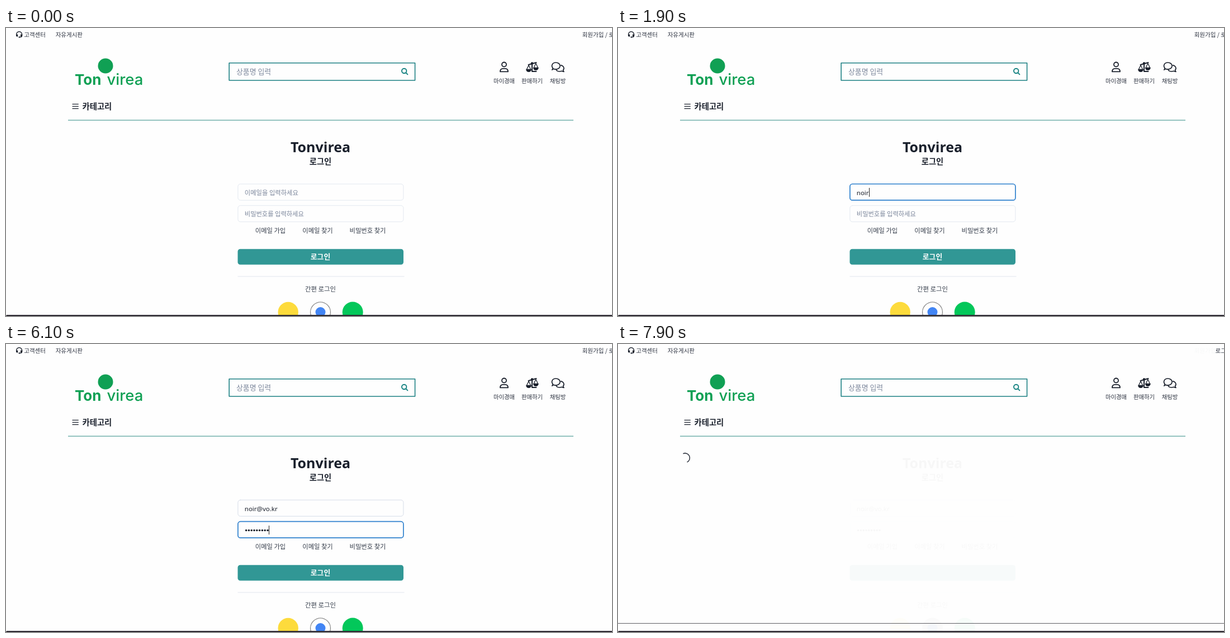
An HTML page with a canvas that plays this animation: 1084 px wide and 517 px high, repeating every 8 s.

```html
<!DOCTYPE html>
<html lang="ko">
<head>
<meta charset="utf-8">
<title>로그인</title>
<style>
html, body { margin: 0; width: 100%; height: 100%; overflow: hidden; background: #fefefe; }
canvas { display: block; width: 1084px; height: 517px; }
</style>
</head>
<body>
<canvas id="stage" width="1084" height="517"></canvas>
<script>
const ctx = document.getElementById('stage').getContext('2d');
const LOOP = 8000, STEP = 100;
const KO = '"Noto Sans CJK KR", "Noto Sans CJK JP", "Noto Sans CJK", sans-serif';
const LATIN = '"Noto Sans", "Open Sans", sans-serif';
const INK = '#1a202c', TEAL = '#319795', TEAL_DARK = '#2c7a7b', GREEN = '#10a054';
const HINT = '#7b869b', BORDER = '#e2e8f0', FOCUS = '#3182ce';

const EMAIL = 'noir@vo.kr';
const EMAIL_KEYS = [1200, 1500, 1700, 1900, 2400, 2800, 3000, 3300, 3500, 3700];
const PASS_KEYS = [4300, 4400, 4500, 4600, 5000, 5500, 5600, 5800, 6100];
const SUGGESTIONS = ['hh@hh', '11', '11111', 'rr', 'dd', '11123435'];
const LEAVE = 7500;

const clamp = v => Math.max(0, Math.min(1, v));
const typed = (keys, t) => keys.filter(k => k <= t).length;
// Reaches 1 one step after its start, passing through one half.
const turnOn = (t, start) => clamp((t - start + STEP) / (2 * STEP));

const text = (str, x, y, size, color, { font = LATIN, weight = 400, align = 'left' } = {}) => {
  ctx.font = `${weight} ${size}px ${font}`;
  ctx.textAlign = align;
  ctx.fillStyle = color;
  ctx.fillText(str, x, y);
};

// Hangul text placed by its vertical middle.
const ko = (str, x, cy, size, color = '#2d3340', opts = {}) =>
  text(str, x, cy + size * 0.37, size, color, { font: KO, ...opts });

const fade = (alpha, draw) => {
  if (alpha <= 0) return;
  ctx.save();
  ctx.globalAlpha = alpha;
  draw();
  ctx.restore();
};

const rect = (x, y, w, h, color) => {
  ctx.fillStyle = color;
  ctx.fillRect(x, y, w, h);
};

const rounded = (x, y, w, h, r) => {
  ctx.beginPath();
  ctx.roundRect(x, y, w, h, r);
};

const disc = (x, y, r, color) => {
  ctx.beginPath();
  ctx.arc(x, y, r, 0, 7);
  ctx.fillStyle = color;
  ctx.fill();
};

const line = (d, width, color = INK) => {
  ctx.lineWidth = width;
  ctx.strokeStyle = color;
  ctx.lineCap = ctx.lineJoin = 'round';
  ctx.stroke(new Path2D(d));
};

const shape = (d, color = INK) => {
  ctx.fillStyle = color;
  ctx.fill(new Path2D(d));
};

const headset = () => {
  line('M18.6 13V11.5A5 5 0 0 1 28.6 11.5V13.5Q28.6 16.3 25.8 16.3H24', 1.3);
  shape('M18 11.5h3.2v4h-1.4Q18 15.5 18 13.6zM26 11.5h3.2v2.1Q29.2 15.5 27.4 15.5H26z');
  disc(23.8, 16.4, 1.2, INK);
};

const person = () => {
  line('M895 65.5A4 4 0 1 1 887 65.5A4 4 0 1 1 895 65.5', 1.8);
  line('M884 78.4C884 74.5 886.3 72.8 889 72.8H893C895.7 72.8 898 74.5 898 78.4Z', 1.8);
};

const scales = () => {
  line('M941 62.5V78H948.5M934.5 66L948.5 62', 2);
  disc(941, 63.5, 2.2, INK);
  line('M935 67L931.2 74.5H938.8ZM947.8 63.5L944 71.5H951.6Z', 1.3);
  shape('M930 74.2H940Q939.4 79 935 79T930 74.2ZM942.8 71H952.8Q952.2 76 947.8 76T942.8 71Z');
};

const comments = () => {
  line('M979 73.4L976.8 75.2Q978 73.4 978.2 71.8C974.5 67.5 977.5 62 983.5 62C988 62 991 64.6 991 68C991 72.6 985.5 75.4 979 73.4Z', 1.7);
  line('M992.5 66.8C997.8 67.8 999.4 72.6 996.5 75.6Q996.8 77.2 998 78.4Q995.6 78.2 994 77.3C990 78.7 986 77.6 984.3 75.4', 1.7);
};

const header = t => {
  headset();
  ko('고객센터', 32.3, 12.5, 10.5);
  ko('자유게시판', 88.7, 12.5, 10.5);

  disc(178, 68, 13.5, GREEN);
  text('Ton', 123, 102, 26, GREEN, { font: 'Inter, sans-serif', weight: 700 });
  text('virea', 180.5, 102, 27.5, GREEN, { font: 'Inter, sans-serif', weight: 500 });

  ctx.lineWidth = 1.6;
  ctx.strokeStyle = '#1d8083';
  ctx.strokeRect(399.2, 62.8, 332.4, 31.2);
  ko('상품명 입력', 412, 78.5, 12.9, HINT);
  line('M716.4 77A4.2 4.2 0 1 1 708 77A4.2 4.2 0 1 1 716.4 77M715.4 80.4L718.4 83.4', 1.9, '#12807f');

  person();
  scales();
  comments();
  ko('마이경매', 891, 95.5, 10.4, '#2d3340', { align: 'center' });
  ko('판매하기', 941, 95.5, 10.4, '#2d3340', { align: 'center' });
  ko('채팅방', 987, 95.5, 10.4, '#2d3340', { align: 'center' });

  line('M119 136.7H129.3M119 140.7H129.3M119 144.7H129.3', 1.2);
  ko('카테고리', 136.6, 140.3, 14.3, INK, { weight: 700 });
  rect(111, 164.8, 904, 1.4, '#67aaa4');

  if (t >= LEAVE) ko('로그아웃', 1068.5, 12.5, 10.5);
};

const field = (y, focus, color) => {
  rounded(414.9, y + 0.5, 296, 29.2, 4.5);
  ctx.lineWidth = 1;
  ctx.strokeStyle = color;
  ctx.stroke();
  const base = ctx.globalAlpha;
  ctx.globalAlpha = base * focus;
  ctx.lineWidth = 1.7;
  ctx.strokeStyle = FOCUS;
  ctx.stroke();
  ctx.globalAlpha = base;
};

const caret = (x, y) => rect(Math.round(x), y, 1, 16, '#222');

const emailField = t => {
  const focus = turnOn(t, 600) - turnOn(t, 4000);
  field(279.5, focus, t >= 4000 ? '#d5dce8' : BORDER);
  const value = EMAIL.slice(0, typed(EMAIL_KEYS, t));
  if (value) text(value, 426.8, 300, 11.5, INK);
  else ko('이메일을 입력하세요', 426.8, 295.5, 11.3, HINT);
  if (t >= 600 && t < 4000) {
    ctx.font = `400 11.5px ${LATIN}`;
    caret(426.8 + ctx.measureText(value).width, 287);
  }
};

const passwordField = t => {
  field(318.2, turnOn(t, 4000) - turnOn(t, 7200), BORDER);
  const count = typed(PASS_KEYS, t);
  if (!count) ko('비밀번호를 입력하세요', 426.8, 334, 11.25, HINT);
  for (let i = 0; i < count; i++) disc(429.6 + i * 4.8, 334.6, 1.75, INK);
  if (t >= 4000 && t < 6600) caret(427 + count * 4.8, 326);
};

const buttonColor = t => {
  if (t < 7000) return TEAL;
  return t >= 7200 && t < 7300 ? '#296a6c' : TEAL_DARK;
};

const login = t => {
  const mid = { align: 'center' };
  text('Tonvirea', 562.5, 223, 25, INK, { weight: 700, ...mid });
  ko('로그인', 562.5, 240, 14.3, INK, { weight: 600, ...mid });

  emailField(t);
  passwordField(t);
  ko('이메일 가입', 473, 364, 11.3, '#333b49', mid);
  ko('이메일 찾기', 557.5, 364, 11.3, '#333b49', mid);
  ko('비밀번호 찾기', 647, 364, 11.3, '#333b49', mid);

  rounded(414.5, 396.7, 296.5, 28, 4.5);
  ctx.fillStyle = buttonColor(t);
  ctx.fill();
  ko('로그인', 562.5, 410.5, 12.8, '#fff', { weight: 700, ...mid });

  rect(414.5, 445.5, 298, 1, BORDER);
  ko('간편 로그인', 562.5, 468.5, 11.4, '#333b49', mid);
  disc(504.7, 510, 18.2, '#fddb3c');
  disc(562.5, 510, 18.5, '#777');
  disc(562.5, 510, 17.4, '#fefefe');
  disc(562.5, 510, 9, '#4285f4');
  disc(620.2, 510, 18.5, '#03c75a');
};

const popup = () => {
  ctx.fillStyle = '#231a1c';
  ctx.shadowColor = 'rgba(0,0,0,.4)';
  ctx.shadowBlur = 3;
  ctx.shadowOffsetY = 1;
  rounded(487.5, 317, 116.3, 166.3, 5);
  ctx.moveTo(496.5, 317.5);
  ctx.lineTo(503.5, 310.5);
  ctx.lineTo(510.5, 317.5);
  ctx.fill();
  ctx.shadowColor = 'transparent';
  SUGGESTIONS.forEach((s, i) => text(s, 496.5, 336.8 + i * 26.7, 9.4, '#eee6e7'));
};

const spinner = t => {
  const from = (-115 + (t - 7900) * 0.8) * Math.PI / 180;
  ctx.beginPath();
  ctx.arc(120, 204.5, 8.4, from, from + Math.PI);
  ctx.lineWidth = 1.4;
  ctx.lineCap = 'butt';
  ctx.strokeStyle = INK;
  ctx.stroke();
};

const render = t => {
  rect(0, 0, 1084, 517, '#fefefe');
  const remain = t < LEAVE ? 1 : 0.5 ** ((t - LEAVE) / STEP + 1);
  fade(remain, () => {
    ko('회원가입 / 로그인', 1030.7, 12.5, 10.5);
    login(t);
  });
  header(t);
  fade(clamp((t - 600) / 400) * clamp((1500 - t) / 400), popup);
  if (t >= LEAVE) {
    spinner(t);
    rect(0, 501, 1084, 1, '#5d5d63');
  }
  rounded(0, 515, 1090, 6, [2, 0, 0, 0]);
  ctx.fillStyle = '#2b2730';
  ctx.fill();
};

const tick = now => {
  render(Math.floor(now % LOOP / STEP) * STEP);
  requestAnimationFrame(tick);
};
requestAnimationFrame(tick);
</script>
</body>
</html>
```
